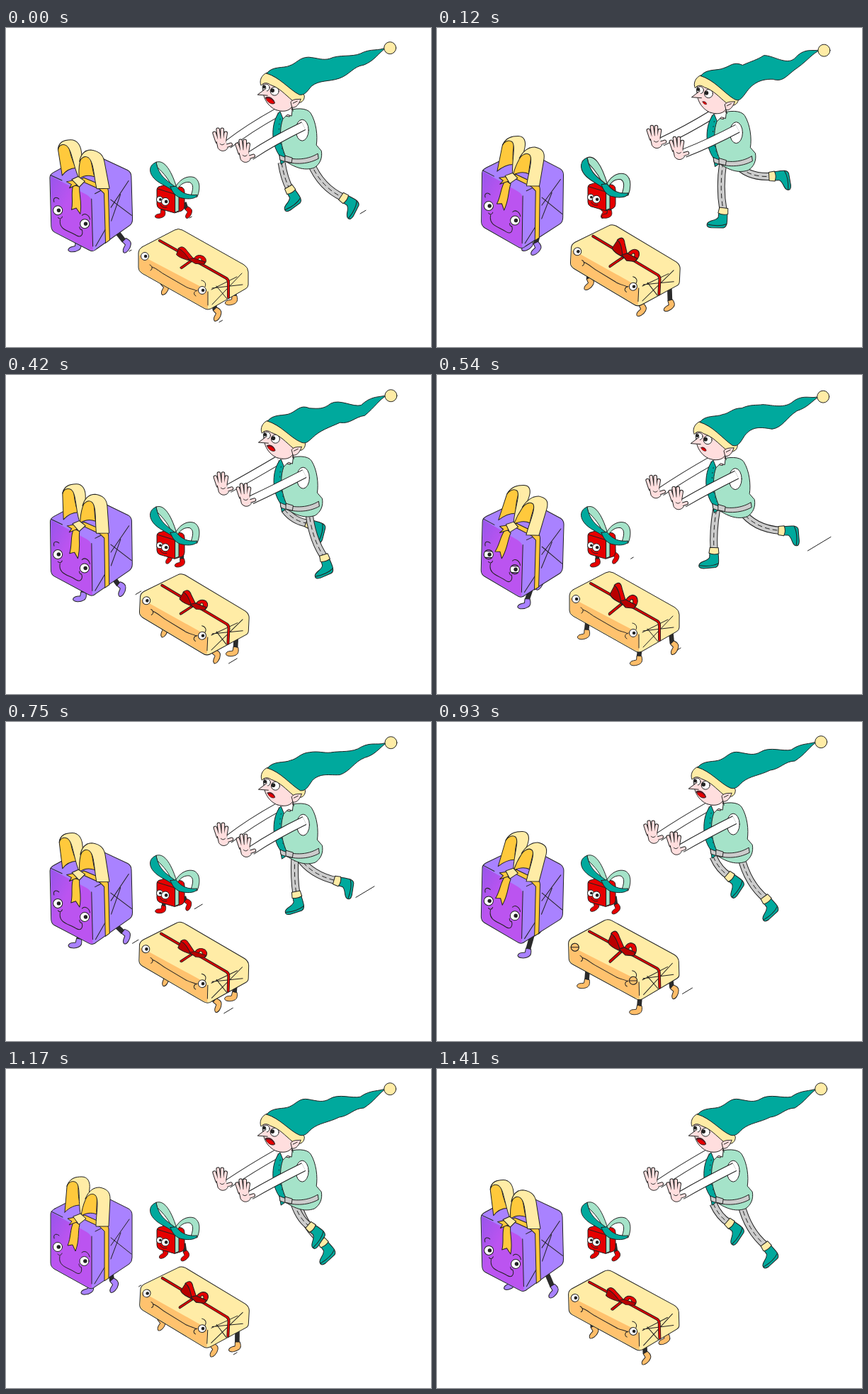
An HTML page for the animation above (1440 ms loop, 600x450 px).

```html
<!DOCTYPE html>
<html lang="en">
<head>
<meta charset="utf-8">
<title>Runaway gifts</title>
<style>
html, body { margin: 0; width: 100%; height: 100%; overflow: hidden; background: #fff; }
svg { display: block; width: 600px; height: 450px; }
svg * { stroke-linejoin: round; stroke-linecap: round; }
.o { stroke: #222; stroke-width: 1; }
.l { fill: none; stroke: #222; stroke-width: 1; }
.teal { fill: #00a99d; } .mint { fill: #a5e3c9; } .pale { fill: #ffeca6; }
.gold { fill: #ffc93c; } .skin { fill: #ffdede; } .red { fill: #e60000; }
.grey { fill: #ccc; } .white { fill: #fff; } .lilac { fill: #a982ff; }
.orange { fill: #ffc26e; }
</style>
</head>
<body>
<svg viewBox="0 0 600 450">
  <g id="elfLegs"></g>
  <g id="elf">
    <g id="farArm"></g>
    <path class="o mint" d="M392 118C408 112 425 112 430 120C438 133 440 152 438 165L445 173C447 183 443 192 435 197C420 202 406 196 392 186C380 165 376 138 384 120Z"/>
    <path class="o teal" d="M386 118C374 132 373 162 386 180L388 192L397 186C386 165 384 140 393 123Z"/>
    <path class="l" stroke-dasharray="1 6" d="M387 128C383 145 386 162 392 176"/>
    <path class="o grey" d="M386 179C402 187 424 187 440 177L441 184C425 193 404 193 387 186Z"/>
    <path class="o grey" d="M394 180L404 183L403 190L394 188Z"/>
    <ellipse class="o white" cx="418" cy="144" rx="9" ry="15"/>
    <g id="nearArm"></g>
    <path class="o skin" d="M388 113L390 123L400 125L404 112Z"/>
    <path class="o white" d="M387 118L391 128L397 122L403 124L404 115"/>
    <path class="o skin" d="M364 74C359 92 366 108 380 115C394 120 404 116 406 104L402 90Z"/>
    <circle class="o white" cx="367" cy="84" r="5"/>
    <circle cx="364.5" cy="83" r="2.4" fill="#222"/>
    <path class="o skin" d="M367 85L355 94L369 95"/>
    <circle class="o white" cx="379" cy="89" r="6"/>
    <circle cx="376" cy="88" r="2.8" fill="#222"/>
    <g id="mouth">
      <path class="o" fill="#7c1020" d="M-7 -3C-4 -6 5 -3 6.500 5C3 8 -5 4 -7 -3Z"/>
      <path class="red" d="M-6 -1C-1 -3 4 1 6 5C1 6 -4 4 -6 -1Z"/>
    </g>
    <path class="o pale" d="M368 63C360 66 357 75 360 81C364 76 369 77 373 80C386 84 394 94 404 102C411 109 422 105 421 95L414 88Z"/>
    <path class="o skin" d="M402 104C406 99 412 101 416 100C414 106 410 113 404 112Z"/>
    <path class="l" d="M405 106L411 103M404 113l1 4"/>
    <path id="hat" class="o teal" d="M368 64C375 53 392 57 400 53C410 50 414 41 427 41C440 42 447 46 457 43C470 37 488 41 500 36C515 28 526 33 537 27C525 36 520 46 505 52C490 54 485 66 470 71C455 76 442 73 431 82C425 89 422 95 414 94C400 87 386 69 368 64Z"/>
    <circle class="o pale" cx="542" cy="28" r="8.500"/>
  </g>

  <g id="purpleLegs"></g>
  <g id="purple">
    <path class="o lilac" d="M69 197L114 174Q120 171 127 174L173 197Q178 200 178 206L178 266Q178 272 174 275L126 307Q121 312 115 308L68 282Q63 279 63 273L63 205Q63 200 69 197Z"/>
    <path fill="url(#plum)" d="M64 202L114 230Q121 234 121 241L121 309L115 307L68 281Q64 279 64 273Z"/>
    <path class="l" d="M121 236L121 303M126 229L134 225M64 201L80 209M125 303L139 280M148 249L174 212M148 238L177 261M148 268L162 231"/>
    <path class="o gold" d="M104 209L111 206L140 219Q145 221 145 226L145 295L139 299L139 229L133 223Z"/>
    <path class="l" d="M68 239C66 232 72 232 75 235M107 259C111 255 117 259 118 265M73 261C75 264 78 263 79 260M76 264C73 279 88 280 98 287C106 292 108 284 106 279C104 280 103 277 103 275"/>
    <g id="purpleEyes"></g>
    <g id="tail"><path class="o gold" d="M96 215L104 219C101 231 104 241 98 257L94 248L87 249C92 238 90 225 96 215Z"/></g>
    <g id="purpleBow">
      <path class="o gold" d="M104 208L87 211L93 215L89 220L105 214Z"/>
      <path class="o gold" d="M83 202L86 166C88 157 96 152 103 153C101 170 102 182 105 192C97 192 90 195 83 202Z"/>
      <path class="o pale" d="M86 165C90 154 98 152 107 152C116 152 119 160 118 169C117 185 111 196 106 209C101 190 106 166 99 160C94 157 89 159 86 165Z"/>
      <path class="o gold" d="M106 207C108 192 114 175 125 168C131 177 127 192 128 205C121 202 113 203 106 207Z"/>
      <path class="o pale" d="M112 183C117 171 124 167 132 167C143 169 147 174 147 183L145 222L127 222C127 205 132 184 126 178C121 174 116 178 112 183Z"/>
      <path class="o pale" d="M95 208L105 204L113 211L103 219Z"/>
    </g>
  </g>

  <g id="redLegs"></g>
  <g id="redBox">
    <path class="o red" d="M216 221L229 217L249 222Q252 224 252 228L252 249Q252 253 248 255L238 258L217 252Q213 250 213 246L213 225Q213 222 216 221Z"/>
    <path class="l" d="M214 224L237 231Q239 232 239 236L239 257"/>
    <path class="o mint" d="M239 231L244 228L244 255L239 257Z"/>
    <path class="l" d="M218 246C219 250 224 251 227 250"/>
    <g id="redEyes"></g>
    <g id="redBow">
      <path class="o mint" d="M212 184C222 180 232 192 241 222L236 226C231 210 222 200 214 192Z"/>
      <path class="o teal" d="M212 184C202 188 201 198 208 207C215 216 226 219 236 227L240 222C229 212 216 207 212 184Z"/>
      <path class="o mint" d="M237 226C243 210 256 203 266 207C276 213 273 228 270 236L260 237C264 226 266 217 259 214C250 213 244 220 241 226Z"/>
      <path class="o teal" d="M232 221L240 220C248 231 257 234 270 233C269 239 258 240 249 238C241 237 235 230 232 221Z"/>
    </g>
  </g>

  <g id="yellowLegs"></g>
  <g id="yellow">
    <path class="l" d="M192 311C192 305 197 305 199 308"/>
    <path class="o pale" d="M192 306L238 282Q243 279 249 282L336 331Q342 335 342 341L342 359Q342 363 338 365L291 392Q285 396 279 392L192 343Q187 340 187 335L187 314Q187 309 192 306Z"/>
    <path class="orange" d="M188 318Q190 317 195 320L279 364Q285 367 285 372L285 393L279 391L192 342Q188 339 188 335Z"/>
    <path class="l" d="M285 369L285 388M290 366L326 348M291 364L334 359M291 387L333 343M297 361L312 379"/>
    <path d="M217 297L311 350Q314 352 314 356L314 377" fill="none" stroke="#222" stroke-width="4"/>
    <path d="M217 297L311 350Q314 352 314 356L314 377" fill="none" stroke="#d60000" stroke-width="2.400"/>
    <path class="l" d="M204 339C208 337 206 332 203 331M206 334C213 336 218 342 226 346L252 361C260 366 266 365 269 368M270 367C265 368 264 373 268 375M276 353C281 354 283 358 281 362"/>
    <g id="yellowEyes"></g>
    <g id="yellowBow">
      <path d="M262 325L246 337" stroke="#222" stroke-width="4"/>
      <path d="M262 325L246 337" stroke="#d60000" stroke-width="2.400"/>
      <path class="o" fill="#b80000" d="M262 326C253 323 245 320 242 315L247 304L256 314Z"/>
      <path class="o red" d="M246 305C251 300 255 302 258 309L266 323L261 327C256 316 252 307 246 305Z"/>
      <path class="o red" d="M264 326C266 318 273 313 280 318C284 322 283 327 280 330L274 329C278 324 276 320 273 321L268 328Z"/>
      <path class="o" fill="#b80000" d="M258 323L265 321L281 327L279 331L267 330Z"/>
    </g>
  </g>
  <g id="streaks"></g>
  <defs>
    <linearGradient id="plum" x1="0" y1="0.05" x2="0.35" y2="0.4"><stop offset="0" stop-color="#9b55ec"/><stop offset="1" stop-color="#bb54f0"/></linearGradient>
  </defs>
</svg>
<script>
const LOOP = 1440, STEP = 30, TAU = Math.PI * 2;
const ELF = 240, STRIDE = 480, GIFT = 360; // cycle lengths in ms
const $ = id => document.getElementById(id);
const mod = (a, n) => ((a % n) + n) % n;
// Cosine wave that is 1 at the time `peak`
const wave = (t, period, peak = 0) => Math.cos((t - peak) / period * TAU);

function set(node, attrs) {
  for (const k in attrs) node.setAttribute(k, attrs[k]);
  return node;
}
function add(parent, tag, attrs = {}) {
  const node = document.createElementNS('http://www.w3.org/2000/svg', tag);
  parent.appendChild(node);
  return set(node, attrs);
}
const move = (id, transform) => set($(id), { transform });
const around = (x, y, change) => `translate(${x} ${y}) ${change} translate(${-x} ${-y})`;

// Outlined thick line; returns a setter for its path
function tube(parent, width, color, cap = 'butt') {
  const make = (w, stroke) => {
    const p = add(parent, 'path', { fill: 'none', stroke, 'stroke-width': w });
    p.style.strokeLinecap = cap;
    return p;
  };
  const parts = [make(width + 2, '#222'), make(width, color)];
  return d => parts.forEach(p => set(p, { d }));
}

// --- elf ---
const sway = t => 1 - wave(t, ELF, -15);

function elfLeg(shift, dx, dy) {
  const g = add($('elfLegs'), 'g', { transform: `translate(${dx} ${dy})` });
  const limb = tube(g, 9, '#ccc');
  const seam = add(g, 'path', { class: 'l', 'stroke-dasharray': '6 5' });
  const boot = add(g, 'g');
  add(boot, 'path', { class: 'o teal', d: 'M-6 3L-6 10C-9 16 -17 15 -20 20C-22 25 -18 26 -14 26L3 24C9 22 7 12 6 3Z' });
  add(boot, 'path', { class: 'l', d: 'M-20 22C-10 23 0 22 7 18' });
  add(boot, 'path', { class: 'o pale', d: 'M-6 -4L6 -4L7 4Q0 7 -7 4Z' });
  return t => {
    const swing = peak => wave(t + shift, STRIDE, peak);
    const x = 447 + 39 * swing(55), y = 236 - 27 * swing(130);
    const kneeX = 427 + 21 * swing(45), kneeY = 221 - 10 * swing(150);
    const hip = 418 + 12 * swing(0) + 1.5 * sway(t);
    const d = `M${hip} ${190 - dy}Q${kneeX} ${kneeY} ${x} ${y}`;
    limb(d);
    set(seam, { d });
    set(boot, { transform: `translate(${x} ${y}) rotate(${-43 - 52 * swing(100)})` });
  };
}
const elfLegs = [elfLeg(STRIDE / 2, -17, -5), elfLeg(0, 0, 0)];

function arm(id, sx, sy, hx, hy) {
  const sleeve = tube($(id), 11, '#fff');
  const hand = add($(id), 'g');
  tube(hand, 3.6, '#ffdede', 'round')('M-6 2L-10 -10M-3 0L-5 -15M1 0L1 -15M4 2L6 -10M4 9L13 6');
  add(hand, 'path', { class: 'skin', d: 'M-7 0C-4 -3 3 -3 6 1L8 10C6 16 -1 17 -5 12Z' });
  add(hand, 'path', { class: 'l', d: 'M-7 2L-5 11C-1 17 6 16 9 11M-2 5C0 7 2 7 4 5' });
  return t => {
    const push = wave(t, ELF, 15), bend = 2 - 2 * push;
    const y = hy - 2.5 + 4 * push;
    sleeve(`M${sx} ${sy}Q${(sx + hx) / 2 + bend} ${(sy + y) / 2 + bend + 2} ${hx + 9} ${y + 6}`);
    set(hand, { transform: `translate(${hx} ${y})` });
  };
}
const arms = [arm('farArm', 383, 119, 304, 157), arm('nearArm', 420, 138, 336, 173)];

// Ripples run along the hat towards the bobble
const hatShape = $('hat').getAttribute('d');
function ripple(t) {
  return hatShape.replace(/(\d+) (\d+)/g, (_, x, y) => {
    const u = Math.max(0, (x - 400) / 137);
    const phase = (x - 425) / 64 * ELF;
    const lift = 4 * Math.min(1, 5 * u, 5 * (1 - u));
    return `${x} ${+y + lift * (wave(phase, ELF) - wave(phase, ELF, t))}`;
  });
}

function drawElf(t) {
  elfLegs.forEach(f => f(t));
  arms.forEach(f => f(t));
  move('elf', `translate(${2.3 * sway(t)} ${1.9 * sway(t)})`);
  set($('hat'), { d: ripple(t) });
  const m = .7 + .3 * wave(t, ELF, -20);
  move('mouth', `translate(${374 - m} ${102 - m}) scale(${m})`);
}

// --- gifts ---
// Each foot runs round an oval; `lag` is the part of the cycle where it is highest
function giftLegs(id, gait, fill, size) {
  const { x, y, rx, ry, lag, period, hip } = gait;
  return (shift, dx, dy) => {
    const g = add($(id), 'g', { transform: `translate(${dx} ${dy})` });
    const leg = add(g, 'path', { stroke: '#2b2b2b', 'stroke-width': 7 * size, fill: 'none' });
    leg.style.strokeLinecap = 'butt';
    const foot = add(g, 'path', { class: 'o', fill, d: 'M-3 -1L-4 5C-7 6 -13 5 -14 10C-13 14 -4 14 1 11C5 9 5 4 4 0Z' });
    return t => {
      const turn = part => wave(t + shift * period, period, part * period);
      const fx = x + rx * turn(.02), fy = y - ry * turn(lag);
      set(leg, { d: `M${(fx + x) / 2} ${hip}L${fx} ${fy + 1}` });
      set(foot, { transform: `translate(${fx} ${fy}) rotate(${-28 - 32 * turn(.11)}) scale(${size})` });
    };
  };
}
const purpleLeg = giftLegs('purpleLegs', { x: 147, y: 308, rx: 20, ry: 13, lag: .14, period: GIFT, hip: 288 }, '#a982ff', 1);
const yellowLeg = giftLegs('yellowLegs', { x: 290, y: 397, rx: 5, ry: 7.5, lag: .25, period: GIFT, hip: 375 }, '#ffbd69', .95);
const redLeg = giftLegs('redLegs', { x: 249, y: 256, rx: 6, ry: 4, lag: .19, period: ELF, hip: 246 }, '#e60000', .8);
const legs = [
  purpleLeg(.5, -26, -14), purpleLeg(0, 0, 0),
  yellowLeg(0, -74, -37), yellowLeg(.5, 37, -19), yellowLeg(0, 0, 0),
  redLeg(.5, -22, 0), redLeg(0, 0, 0)
];

function eye(id, x, y, r, lidFill) {
  const g = add($(id), 'g', { transform: `translate(${x} ${y})` });
  add(g, 'circle', { class: 'o white', r });
  add(g, 'circle', { cx: r * .2, r: r * .42, fill: '#222' });
  const lid = add(g, 'path', { class: 'o', fill: lidFill });
  return shut => {
    const h = r * (1 - shut), w = Math.sqrt(r * r - h * h), arc = `A${r} ${r} 0 0`;
    set(lid, { d: shut > 0 ? `M${-w} ${-h}${arc} 1 ${w} ${-h}ZM${-w} ${h}${arc} 0 ${w} ${h}Z` : '' });
  };
}
const purpleEyes = [eye('purpleEyes', 73, 251, 6.5, '#bb54f0'), eye('purpleEyes', 110.5, 271, 6.5, '#bb54f0')];
const yellowEyes = [eye('yellowEyes', 196, 319, 5.5, '#ffc26e'), eye('yellowEyes', 277, 367, 5.5, '#ffc26e')];
eye('redEyes', 217, 239, 4.5, '#e60000');
eye('redEyes', 225, 242, 5.5, '#e60000');
const blink = (t, mid) => Math.max(0, 1 - Math.abs(t - mid) / 75);

function drawGifts(t) {
  legs.forEach(f => f(t));
  const c = wave(t, GIFT), s = wave(t, GIFT, GIFT / 4);
  move('purple', `translate(0 ${2.1 * (1 + wave(t, GIFT / 2)) + .7 * c}) ` + around(121, 245, `rotate(${-1.6 * c})`));
  move('purpleBow', around(105, 214, `skewX(${12 * c})`));
  move('tail', around(100, 216, `rotate(${-9 * c})`));
  purpleEyes.forEach(f => f(blink(t, 590)));

  move('yellow', `translate(0 ${3 * c - .6 * s}) ` + around(290, 365, `rotate(${1.2 * s}) skewX(${-2 * s})`));
  move('yellowBow', around(262, 326, `skewX(${9 * c - 9 * s}) scale(1 ${1.05 - .2 * c})`));
  yellowEyes.forEach(f => f(blink(t, 930)));

  const hop = wave(t, ELF);
  move('redBox', `translate(0 ${1.3 + 1.6 * hop})`);
  move('redBow', around(238, 224, `scale(1 ${.98 - .04 * hop})`));
}

// --- speed lines ---
// `reach` gives the near and far end, in px to the right of the push-off
function streak(x, y, period, start, reach) {
  const line = add($('streaks'), 'path', { class: 'l' });
  return t => {
    const [a, b] = reach(mod(t - start, period));
    set(line, { d: b > a ? `M${x + a} ${y - .6 * a}L${x + b} ${y - .6 * b}` : '' });
  };
}
const long = s => [.0065 * s * s, Math.min(60, 8 + .8 * s)];
const short = (size, speed) => s => [.25 * s * speed * size, Math.min(28, 5 + .55 * s * speed) * size];
const streaks = [
  streak(500, 262, STRIDE, 0, long), streak(488, 251, STRIDE, STRIDE / 2, long),
  streak(174, 315, GIFT, 0, short(.6, 1)), streak(259, 268, ELF, 0, short(.65, 1.5)),
  streak(301, 415, GIFT, 0, short(.9, 1)), streak(339, 388, GIFT, GIFT / 2, short(1, 1))
];

function draw(t) {
  drawElf(t);
  drawGifts(t);
  streaks.forEach(f => f(t));
}
const begin = performance.now();
function frame() {
  const t = mod(performance.now() - begin, LOOP);
  draw(Math.floor(t / STEP) * STEP);
  requestAnimationFrame(frame);
}
frame();
</script>
</body>
</html>
```
